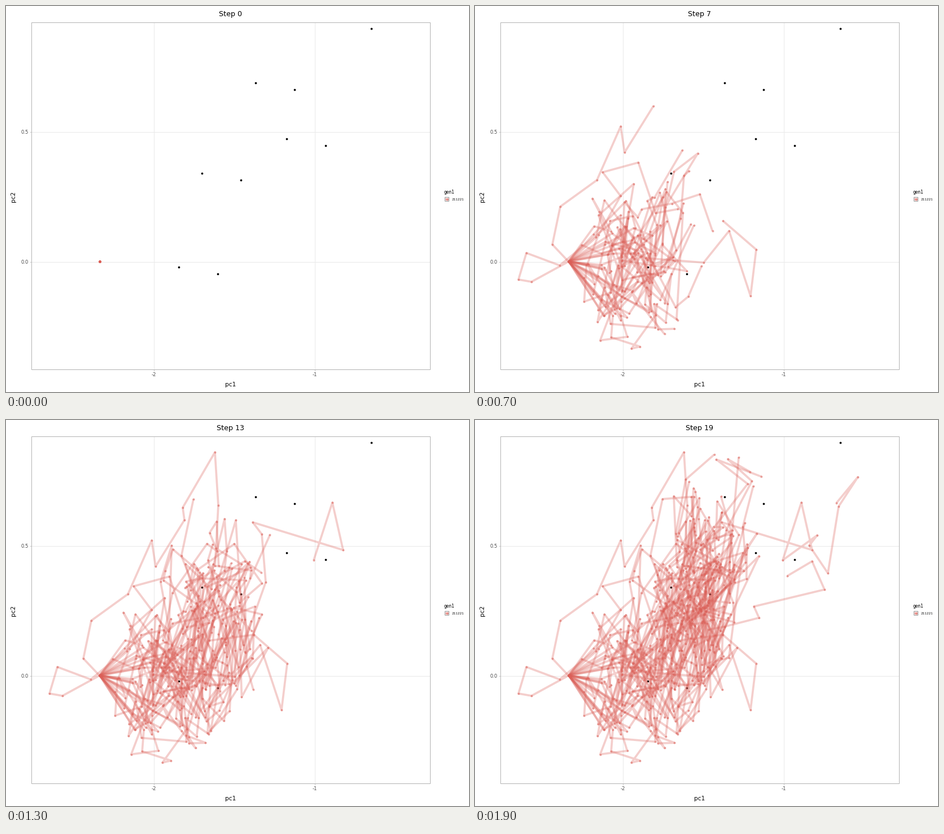
A matplotlib script that plays this animation: 820x683 px, repeating every 2000 ms.

```python
import numpy as np
import matplotlib.pyplot as plt
from matplotlib.animation import FuncAnimation
from matplotlib.collections import LineCollection
from matplotlib.patches import Rectangle

W, H, DPI = 820, 683, 64
PT = 72 / DPI                      # points per pixel
STEPS, WALKERS = 20, 31
RED, GRID, FRAME, TICK = "#db5f57", "#e9e9e9", "#b3b3b3", "#4d4d4d"
LEFT, TOP, RIGHT, BOTTOM = 44.5, 28.5, 750.5, 642.5
START = (166, 452)

# The few walkers that stray far: first step, then key places
STRAYS = [
    (1, [(100, 488), (77, 484), (91, 437), (150, 459)]),
    (2, [(137, 422), (151, 355), (216, 308), (258, 213), (265, 259),
         (316, 177), (313, 155), (370, 57), (376, 151)]),
    (3, [(405, 454), (450, 398), (488, 513), (498, 431), (439, 380)]),
    (8, [(460, 287), (453, 202), (437, 181), (597, 230), (578, 146),
         (545, 248), (606, 204), (592, 222), (625, 271), (644, 153),
         (678, 101), (640, 147)]),
    (15, [(503, 350), (494, 330), (619, 300), (597, 250), (553, 276)]),
]


def bounded_noise(rng, rho=0.66, limit=1.7):
    """Correlated noise, one row per step, kept within +-limit."""
    noise = np.zeros((STEPS, 2))
    noise[0] = rng.normal(size=2)
    for i in range(1, STEPS):
        kick = rng.normal(size=2) * np.sqrt(1 - rho ** 2)
        noise[i] = np.clip(rho * noise[i - 1] + kick, -limit, limit)
    return noise


def cloud_walk(rng):
    """Wander around a centre that drifts right, then up."""
    s = np.arange(STEPS)
    dx, dy = bounded_noise(rng).T
    dx = dx * 46 * (1 - np.exp(-s / 1.5))
    dy = dy * 100 * (1 - np.exp(-s / 1.6))
    x = START[0] + 61 * np.sqrt(s) + dx - 0.22 * dy * s / STEPS
    y = 345 + 125 * np.cos(np.pi * s / 22) + dy
    path = np.column_stack([x, y])
    path[0] = START
    return path


def follow(path, first, places):
    """Bend a walk so that it passes through the given places."""
    places = np.array(places, float)
    last = first + len(places) - 1
    lead = (np.arange(first) / first) ** 2
    trail = 0.45 ** np.arange(1, STEPS - last)
    path[:first] += lead[:, None] * (places[0] - path[first])
    path[last + 1:] += trail[:, None] * (places[-1] - path[last])
    path[first:last + 1] = places


def make_walks():
    rng = np.random.default_rng(5)
    walks = np.array([cloud_walk(rng) for _ in range(WALKERS)])
    for path, (first, places) in zip(walks, STRAYS):
        follow(path, first, places)
    walks[..., 1] = np.maximum(walks[..., 1], 57)
    return walks


def label(x, y, text, px, color="black", **kw):
    kw = {"ha": "center", "va": "baseline", **kw}
    return ax.text(x, y, text, fontsize=px * PT, color=color, **kw)


def rule(xs, ys, color, px=1):
    ax.plot(xs, ys, color=color, lw=px * PT, zorder=1, solid_capstyle="butt")


plt.rcParams["font.family"] = "DejaVu Sans"
fig = plt.figure(figsize=(W / DPI, H / DPI), dpi=DPI, facecolor="white")
ax = fig.add_axes([0, 0, 1, 1])
ax.set_xlim(0, W)
ax.set_ylim(H, 0)
ax.axis("off")

# Panel
for x, name in ((262, "-2"), (547, "-1")):
    rule([x, x], [TOP, BOTTOM], GRID)
    rule([x, x], [BOTTOM, BOTTOM + 3], FRAME, 0.7)
    label(x - 0.3, 654.6, name, 8.45, TICK)
for y, name in ((223, "0.5"), (452.5, "0.0")):
    rule([LEFT, RIGHT], [y, y], GRID)
    rule([LEFT - 3, LEFT], [y, y], FRAME, 0.7)
    label(40.3, y + 3.4, name, 8.45, TICK, ha="right")
ax.add_patch(Rectangle((LEFT, TOP), RIGHT - LEFT, BOTTOM - TOP, fill=False,
                       ec=FRAME, lw=PT, zorder=6))
title = label(397.5, 18, "", 12.67)
label(397.5, 673, "pc1", 10.56)
label(13, 337, "pc2", 10.56, rotation=90, va="center")

# Legend
label(776, 331.6, "gen1", 7.5, ha="left")
label(789.7, 343.6, "211221", 5.6, ha="left")
ax.add_patch(Rectangle((777, 338), 7, 7, fc="white", ec="#8c8c8c",
                       lw=0.9 * PT, zorder=1))
ax.plot([777.5, 783.5], [341.5, 341.5], color=RED, alpha=0.3, lw=4 * PT,
        solid_capstyle="butt")
ax.plot(780.5, 341.5, "o", color=RED, alpha=0.6, ms=4.4 * PT, mew=0)

# Fixed black points come in pairs, plus a single one
pairs = np.array([(306, 461.8), (347.2, 295.6), (442, 136), (496.7, 234.8)])
marks = np.vstack([pairs, pairs + (68.8, 12.3), [(647, 40.4)]])
ax.scatter(*marks.T, s=(3.7 * PT) ** 2, c="black", lw=0, zorder=2)

walks = make_walks()
trails = LineCollection([], colors=RED, alpha=0.3, linewidths=3.7 * PT,
                        joinstyle="round", capstyle="butt", zorder=3)
ax.add_collection(trails, autolim=False)
dots = ax.scatter([], [], s=(3.9 * PT) ** 2, c=RED, alpha=0.55, lw=0, zorder=4)


def draw(step):
    seen = walks[:, :step + 1]
    title.set_text(f"Step {step}")
    trails.set_segments(list(seen) if step else [])
    dots.set_offsets(seen.reshape(-1, 2))
    return title, trails, dots


anim = FuncAnimation(fig, draw, frames=STEPS, interval=100, repeat=True,
                     repeat_delay=0, init_func=lambda: draw(0))
plt.show()
```
